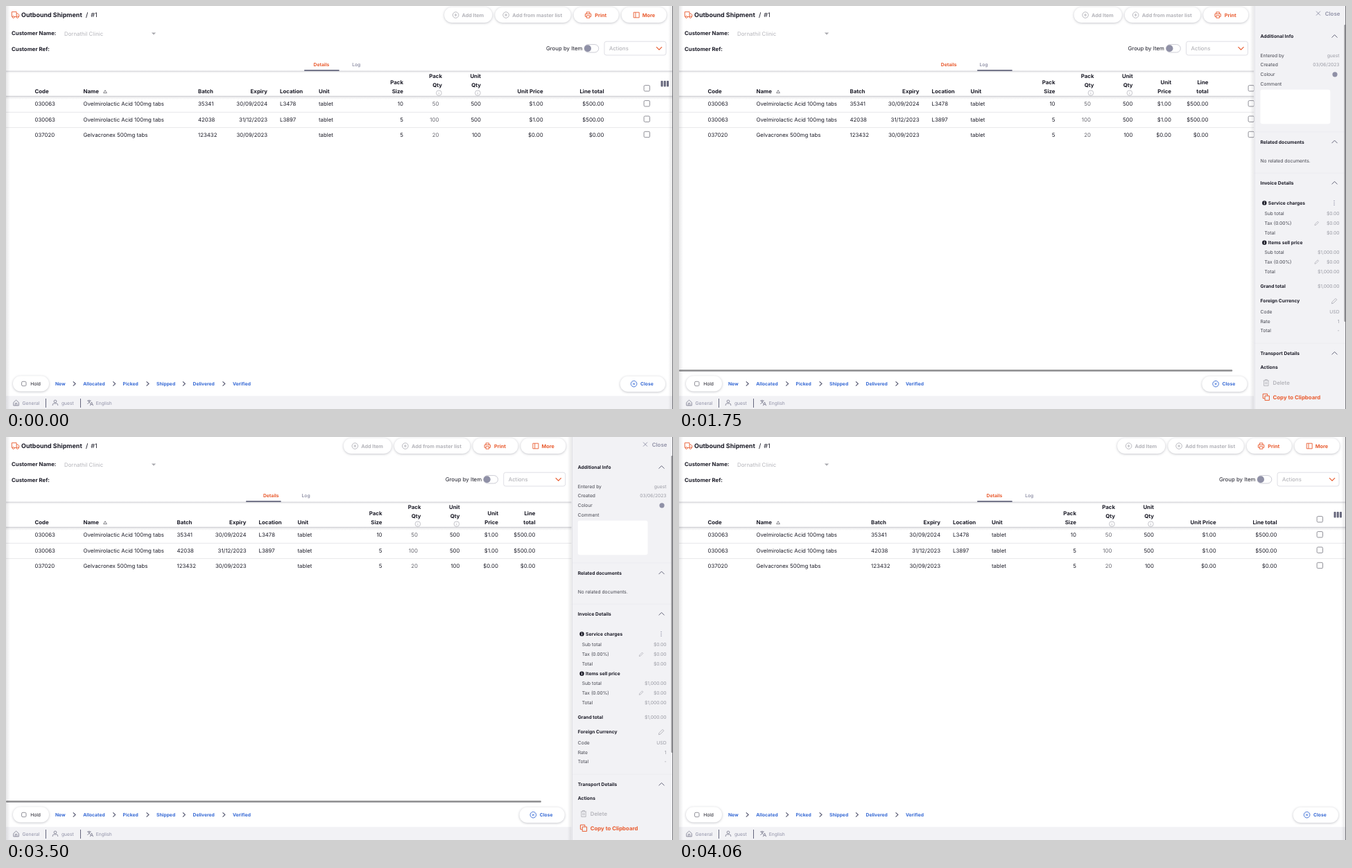
Write an HTML page with a canvas that moves like this. It is 962x582 px and loops after 4690 ms.

```html
<!DOCTYPE html>
<html lang="en">
<head>
<meta charset="utf-8">
<title>Outbound Shipment</title>
<style>
html, body { margin: 0; width: 100%; height: 100%; overflow: hidden; background: #fff; }
canvas { display: block; width: 962px; height: 582px; }
</style>
</head>
<body>
<canvas id="stage"></canvas>
<script>
const WIDTH = 962, HEIGHT = 582, LOOP = 4690, STEP = 70;
const TABLE_MIN = 862;
const ORANGE = '#e95c30', BLUE = '#3568d4', INK = '#1c1c28', SLATE = '#555770';
const GREY = '#8f90a6', PALE = '#b4b4ba', MUTED = '#9a9ba4', PANEL = '#f2f2f5';
const S = 6.72, M = 7.84, L = 8.96;

const canvas = document.getElementById('stage');
const ctx = canvas.getContext('2d');
const ratio = window.devicePixelRatio || 1;
canvas.width = WIDTH * ratio;
canvas.height = HEIGHT * ratio;
ctx.textRendering = 'geometricPrecision';

const circle = (r, x = 0, y = 0) =>
  `M${x + r} ${y}A${r} ${r} 0 1 1 ${x - r} ${y}A${r} ${r} 0 1 1 ${x + r} ${y}Z`;
const ICON = {
  add: circle(4.3) + 'M-2 0H2M0-2V2',
  print: 'M-2.3-1.7V-4.2H2.3V-1.7M-2.3 2.2H-4.2V-1.7H4.2V2.2H2.3M-2.3 .8H2.3V4.2H-2.3Z',
  more: 'M-4-3.8H4V3.8H-4ZM-1.2-3.8V3.8',
  close: circle(4.3) + 'M-1.5-1.5 1.5 1.5M1.5-1.5-1.5 1.5',
  cross: 'M-3-3 3 3M3-3-3 3',
  truck: 'M-5-4.2H1.7V2.8H-5ZM1.7-1.6H3.8L5.4 .2V2.8H1.7',
  wheels: circle(1.4, -2.7, 3.4) + circle(1.4, 3.1, 3.4),
  house: 'M-3.8-.4 0-3.8 3.8-.4V4H-3.8ZM-1.2 4V.6H1.2V4',
  user: circle(1.9, 0, -2) + 'M-3.7 4V2.8Q-3.7 1-1.7 1H1.7Q3.7 1 3.7 2.8V4',
  language: 'M-4.2-3H1.4M-1.4-4.2V-3M.2-3Q-.6 0-4 1.6M-2.8-3Q-1.6-.4 .4 1M0 4.2 2.2-1 4.4 4.2M.8 2.6H3.6',
  pencil: 'M-3.6 3.6-3 1.2 2-3.8 3.8-2-1.2 3Z',
  trash: 'M-4-3H4M-1.5-3V-4.5H1.5V-3M-3.2-3V4.5H3.2V-3M-1-1V2.5M1-1V2.5',
  copy: 'M-1.8-1.8H4.6V4.6H-1.8ZM-2.2 1.8H-4.6V-4.6H1.8V-2.2',
  info: circle(3.8) + 'M0-.5V2M0-2.1V-1.4',
  down: 'M-4-2 0 2 4-2',
  up: 'M-4 2 0-2 4 2',
  right: 'M-1.7-3.2 1.7 0-1.7 3.2',
  sort: 'M-2.4 2 0-2 2.4 2Z',
  caret: 'M-3-1.5H3L0 1.5Z'
};

// Cubic bezier easing with control points (.4, 0) and (x2, 1).
function ease(x, x2) {
  if (x <= 0) return 0;
  if (x >= 1) return 1;
  let lo = 0, hi = 1, s = .5;
  for (let i = 0; i < 24; i++) {
    s = (lo + hi) / 2;
    const u = 1 - s;
    if (1.2 * u * u * s + 3 * x2 * u * s * s + s * s * s < x) lo = s; else hi = s;
  }
  return s * s * (3 - 2 * s);
}

// y is the middle of the capital letters.
function text(str, x, y, { size = M, color = INK, bold = false, weight = bold ? 700 : 400, align = 'left' } = {}) {
  ctx.font = `${weight} ${size}px Inter, sans-serif`;
  ctx.fillStyle = color;
  ctx.textAlign = align;
  ctx.fillText(str, x, y + size * .364);
}

function icon(name, x, y, color, { line = .9, fill = null, scale = 1 } = {}) {
  const path = new Path2D(ICON[name]);
  ctx.save();
  ctx.translate(x, y);
  ctx.scale(scale, scale);
  if (fill) { ctx.fillStyle = fill; ctx.fill(path); }
  ctx.strokeStyle = color;
  ctx.lineWidth = line;
  ctx.stroke(path);
  ctx.restore();
}

function rect(x, y, w, h, color) {
  ctx.fillStyle = color;
  ctx.fillRect(x, y, w, h);
}

function box(x, y, w, h, r, fill, border) {
  ctx.beginPath();
  ctx.roundRect(x, y, w, h, r);
  if (fill) { ctx.fillStyle = fill; ctx.fill(); }
  if (border) { ctx.strokeStyle = border; ctx.lineWidth = .9; ctx.stroke(); }
}

function dot(x, y, r, color) {
  ctx.beginPath();
  ctx.arc(x, y, r, 0, Math.PI * 2);
  ctx.fillStyle = color;
  ctx.fill();
}

function fade(x, y, w, h, x0, y0, x1, y1, alpha) {
  const g = ctx.createLinearGradient(x0, y0, x1, y1);
  g.addColorStop(0, `rgba(60,60,70,${alpha})`);
  g.addColorStop(1, 'rgba(60,60,70,0)');
  rect(x, y, w, h, g);
}

function pill(x, y, w) {
  ctx.save();
  ctx.shadowColor = 'rgba(96,97,112,.4)';
  ctx.shadowBlur = 3.5 * ratio;
  ctx.shadowOffsetY = .7 * ratio;
  box(x, y, w, 22.2, 11.1, '#fff');
  ctx.restore();
}

function clipped(x, w, draw) {
  ctx.save();
  ctx.beginPath();
  ctx.rect(x, 0, w, HEIGHT);
  ctx.clip();
  draw();
  ctx.restore();
}

const checkbox = (x, y, size = 8.4) =>
  box(x - size / 2, y - size / 2, size, size, 1.6, '#fff', '#85858e');

function toolbar(W, open) {
  const buttons = [
    ['More', 'more', 65, 21.5, 30, ORANGE],
    ['Print', 'print', 65, 20.9, 30.6, ORANGE],
    ['Add from master list', 'add', 109.4, 15.8, 25, PALE],
    ['Add Item', 'add', 69.2, 16.5, 25.3, PALE]
  ];
  let x = W - 8.3;
  for (const [label, name, width, iconX, textX, color] of open ? buttons.slice(1) : buttons) {
    x -= width;
    pill(x, 1.8, width);
    icon(name, x + iconX, 13, color);
    text(label, x + textX, 13, { size: 7.28, bold: true, color });
    x -= 4;
  }
}

function heading(W) {
  icon('truck', 13.4, 12.6, ORANGE);
  icon('wheels', 13.4, 12.6, ORANGE, { fill: '#fff' });
  text('Outbound Shipment', 22, 12.8, { size: L, bold: true });
  text('/', 115, 12.8, { size: L, weight: 500 });
  text('#1', 122.3, 12.8, { size: L });
  text('Customer Name:', 8, 39.5, { bold: true });
  text('Dornathil Clinic', 84, 40.6, { color: PALE });
  icon('caret', 213, 40, '#a8a8ae', { fill: '#a8a8ae', line: .1 });
  text('Customer Ref:', 8, 61.7, { bold: true });

  text('Group by Item', W - 129.7, 61.3, { align: 'right' });
  box(W - 127, 55.6, 20.8, 11.4, 5.7, '#fff', '#c7c7d0');
  dot(W - 122, 61.3, 5, GREY);
  box(W - 98, 51.2, 89, 19.8, 3, '#fff', '#dcdce2');
  text('Actions', W - 91, 61.2, { color: '#a8a8ae' });
  icon('down', W - 19, 61.2, ORANGE, { line: 1.2 });
}

function tabs(W, indicator) {
  const tab = { size: S, align: 'center' };
  text('Details', W / 2 - 25.6, 85, { ...tab, bold: true, color: ORANGE });
  text('Log', W / 2 + 24.7, 85, { ...tab, weight: 600, color: GREY });
  rect(0, 93.6, W, 1, '#cfcfd4');
  fade(0, 94.6, W, 3, 0, 94.6, 0, 97.6, .08);
  rect(indicator, 92.2, 50.4, 1.6, SLATE);
}

const ROWS = [
  ['030063', 'Ovelmirolactic Acid 100mg tabs', '35341', '30/09/2024', 'L3478', 'tablet', '10', '50', '500', '$1.00', '$500.00'],
  ['030063', 'Ovelmirolactic Acid 100mg tabs', '42038', '31/12/2023', 'L3897', 'tablet', '5', '100', '500', '$1.00', '$500.00'],
  ['037020', 'Gelvacronex 500mg tabs', '123432', '30/09/2023', '', 'tablet', '5', '20', '100', '$0.00', '$0.00']
];

function table(W) {
  // Spare width is shared between the name, price and total columns.
  const spare = Math.max(0, W - TABLE_MIN);
  const nameExtra = Math.max(0, (spare - 36.4) * .487);
  const priceExtra = (spare - nameExtra) / 2;
  const batch = 246.5 + nameExtra;
  const price = batch + 463.5 + priceExtra;
  const total = price + 53.5 + priceExtra;
  const check = total + 61.8;
  const wraps = spare < 5;
  const columns = [
    ['Code', 41.5], ['Name', 111.5], ['Batch', batch], ['Expiry', batch + 100, 'right'],
    ['Location', batch + 118], ['Unit', batch + 174], ['Pack Size', batch + 296, 'right', true],
    ['Pack Qty', batch + 352, 'right', true, true], ['Unit Qty', batch + 408, 'right', true, true],
    ['Unit Price', price, 'right', wraps], ['Line total', total, 'right', wraps]
  ];

  rect(0, 129.8, W, 1, '#cdcdd2');
  fade(0, 130.8, W, 4, 0, 130.8, 0, 134.8, .12);
  rect(0, 152.9, W, .9, '#e5e5e8');
  rect(0, 175.2, W, .9, '#e5e5e8');

  columns.forEach(([title, x, align = 'left', split, info], i) => {
    const lines = split ? title.split(' ') : [title];
    const bottom = info ? 114.3 : 123.6;
    lines.forEach((line, n) =>
      text(line, x, bottom - (lines.length - 1 - n) * 13.4, { bold: true, align }));
    if (info) icon('info', x - 4.6, 125.6, '#9d9da6', { line: .6 });
    const quantity = i === 7;
    ROWS.forEach((row, r) => text(row[i], quantity ? x - 4.6 : x, 141.4 + r * 22.3,
      { align, color: quantity ? '#66666e' : INK }));
  });
  icon('sort', 143, 123.6, '#66666e', { line: .8 });

  for (const y of [118.8, 140.8, 163.2, 185.5]) checkbox(check, y);
  const bars = Math.max(W, TABLE_MIN) - 10.8;
  for (const dx of [-4.2, 0, 4.2]) box(bars + dx - 1.5, 108, 3, 8.6, .8, '#66677c');

  if (W < TABLE_MIN) box(0, 525.2, W * W / TABLE_MIN, 2.5, 1.2, '#8b8b8d');
}

function footer(W) {
  pill(10, 534.3, 52);
  checkbox(25.8, 545.5, 6.4);
  text('Hold', 35.2, 545.5, { size: S });
  const stages = [['New', 71], ['Allocated', 111.3], ['Picked', 168.6], ['Shipped', 217],
    ['Delivered', 269.6], ['Verified', 327]];
  for (const [label, x] of stages) text(label, x, 545.5, { size: S, bold: true, color: BLUE });
  for (const x of [98.5, 156, 204.3, 256.7, 314.2]) icon('right', x, 545.5, SLATE, { line: 1.1 });

  pill(W - 75.2, 534.8, 65.2);
  icon('close', W - 55.4, 545.7, BLUE);
  text('Close', W - 46, 545.9, { size: S, bold: true, color: BLUE });

  rect(0, 563.2, W, 19, PANEL);
  const items = [['house', 14.6, 'General', 23.6], ['user', 71, 'guest', 80], ['language', 121.3, 'English', 129.8]];
  for (const [name, iconX, label, x] of items) {
    icon(name, iconX, 573, '#77788c', { line: .8 });
    text(label, x, 573.4, { size: S, color: GREY });
  }
  rect(57, 567, .9, 13, SLATE);
  rect(107, 567, .9, 13, SLATE);
}

function infoMark(x, y) {
  dot(x, y, 3.2, INK);
  rect(x - .5, y - .6, 1, 2.4, '#fff');
  rect(x - .5, y - 2, 1, .9, '#fff');
}

const label = (str, x, y, bold) => text(str, x, y, { size: S, bold, color: bold ? INK : '#44454f' });
const value = (str, y) => text(str, 952.5, y, { size: S, color: MUTED, align: 'right' });

function widePanel(P) {
  const stacked = P > 800;
  const shift = stacked ? 13.8 : 0;
  const left = P + 9, inner = P + 15;
  const section = (title, y) => {
    label(title, left, y, true);
    icon('up', 945.5, y, '#66677c', { line: 1 });
  };
  const divider = y => rect(P, y, WIDTH - P, .9, '#ebebf0');

  section('Additional Info', 43.6);
  label('Entered by', left, 71.2);
  value('guest', 71.2);
  label('Created', left, 85);
  value('03/06/2023', 85);
  label('Colour', left, 98.8);
  dot(946, 98.8, 3.6, GREY);
  label('Comment', left, 112.3);
  box(stacked ? left : 850.8, stacked ? 120.8 : 106.8, 100.8, 49.4, 3, '#fff');

  ctx.save();
  ctx.translate(0, shift);
  divider(167.6);
  section('Related documents', 182.3);
  label('No related documents.', left, 209.6);
  divider(227);
  section('Invoice Details', 241.6);
  for (const dy of [-2.8, 0, 2.8]) dot(945, 270.6 + dy, .75, GREY);
  const groups = [['Service charges', 270.4, '$0.00', 286], ['Items sell price', 327.8, '$1,000.00', 341.6]];
  for (const [title, y, amount, first] of groups) {
    infoMark(P + 14.8, y + .2);
    label(title, P + 20.3, y, true);
    label('Sub total', inner, first);
    value(amount, first);
    label('Tax (0.00%)', inner, first + 14);
    icon('pencil', 910 + (P - 793) * .264, first + 14.2, '#a8a8b0', { scale: .75 });
    value('$0.00', first + 14);
    label('Total', inner, first + 28.2);
    value(amount, first + 28.2);
  }
  label('Grand total', left, 390.3, true);
  value('$1,000.00', 390.3);
  label('Foreign Currency', left, 412.2, true);
  icon('pencil', 945, 412.4, '#a8a8b0', { line: .8 });
  [['Code', 'USD', 427.5], ['Rate', '1', 441.3], ['Total', '-', 455.1]].forEach(([name, amount, y]) => {
    label(name, left, y);
    value(amount, y);
  });
  divider(472.8);
  section('Transport Details', 487.6);
  ctx.restore();

  icon('cross', 922, 10.6, GREY);
  text('Close', 931.8, 10.8, { weight: 600, color: GREY });
  label('Actions', left, 522, true);
  icon('trash', P + 17.3, 544, PALE);
  text('Delete', P + 27, 544.2, { weight: 600, color: PALE });
  icon('copy', P + 17.3, 564.8, ORANGE, { line: 1 });
  text('Copy to Clipboard', P + 27, 564.9, { bold: true, color: ORANGE });
  box(959.4, 27, 2.6, stacked ? 429 : 452, 1.2, '#98989c');
}

function narrowPanel(P) {
  const bold = [['Additional', 9, 43.6], ['Info', 9, 55.2], ['Related', 9, 219], ['documents', 9, 230.4],
    ['Invoice', 9, 301.6], ['Details', 9, 313], ['Service', 20.3, 340.2], ['charges', 20.3, 351.6],
    ['Items sell', 20.3, 429.6], ['price', 20.3, 441], ['Actions', 9, 508.4]];
  const plain = [['Entered by', 9, 82.6], ['Created', 9, 96.4], ['Colour', 9, 121.6], ['Comment', 9, 135.2],
    ['No related', 9, 257.8], ['documents.', 9, 269.2], ['Sub total', 15, 365.6], ['Tax', 15, 379.2],
    ['(0.00%)', 15, 390.8], ['Total', 15, 416], ['Sub', 15, 455], ['total', 15, 466.4],
    ['Tax', 15, 480], ['(0.00%)', 15, 491.4]];
  for (const [str, dx, y] of bold) label(str, P + dx, y, true);
  for (const [str, dx, y] of plain) label(str, P + dx, y);
  text('03/06/2023', P + 25, 107.6, { size: S, color: MUTED });
  text('$1,000.00', P + 31.5, 460.8, { size: S, color: MUTED });
  box(P + 9, 143.4, 100, 49.4, 3, '#fff');
  infoMark(P + 14.8, 346);
  infoMark(P + 14.8, 435.6);
  icon('cross', P + 32.2, 10.6, GREY);
  icon('trash', P + 17.3, 530.8, PALE);
  text('Delete', P + 30.5, 530.8, { weight: 600, color: PALE });
  icon('copy', P + 17.3, 558, ORANGE, { line: 1 });
  text('Copy to', P + 31, 551, { bold: true, color: ORANGE });
  text('Clipboard', P + 27.5, 564.5, { bold: true, color: ORANGE });
}

function sidePanel(P) {
  const width = WIDTH - P;
  rect(P, 0, width, HEIGHT, PANEL);
  if (width > 100) widePanel(P);
  else if (width > 10) narrowPanel(P);
  rect(P, 0, .9, HEIGHT, '#d3d3d9');
}

function render(t) {
  const open = t >= 1610 && t < 3500;
  const slide = t < 3400 ? ease((t - 1596.5) / 225, .6) : 1 - ease((t - 3459) / 164, .6);
  const tabSlide = t < 3700 ? ease((t - 1872) / 300, .2) : 1 - ease((t - 3757) / 300, .2);
  const W = 961 - 168 * slide;

  ctx.setTransform(ratio, 0, 0, ratio, 0, 0);
  rect(0, 0, WIDTH, HEIGHT, '#fff');
  clipped(0, W, () => {
    heading(W);
    toolbar(W, open);
    tabs(W, 430.2 - 84 * tabSlide);
    table(W);
    footer(W);
    fade(0, 0, 6, HEIGHT, 0, 0, 6, 0, .12);
    fade(W - 6, 0, 6, HEIGHT, W, 0, W - 6, 0, .12);
  });
  clipped(W, WIDTH - W, () => sidePanel(W));
  rect(961, 0, 1, HEIGHT, '#77777c');
}

function tick(now) {
  render(Math.floor(now % LOOP / STEP) * STEP);
  requestAnimationFrame(tick);
}
render(0);
requestAnimationFrame(tick);
</script>
</body>
</html>
```
